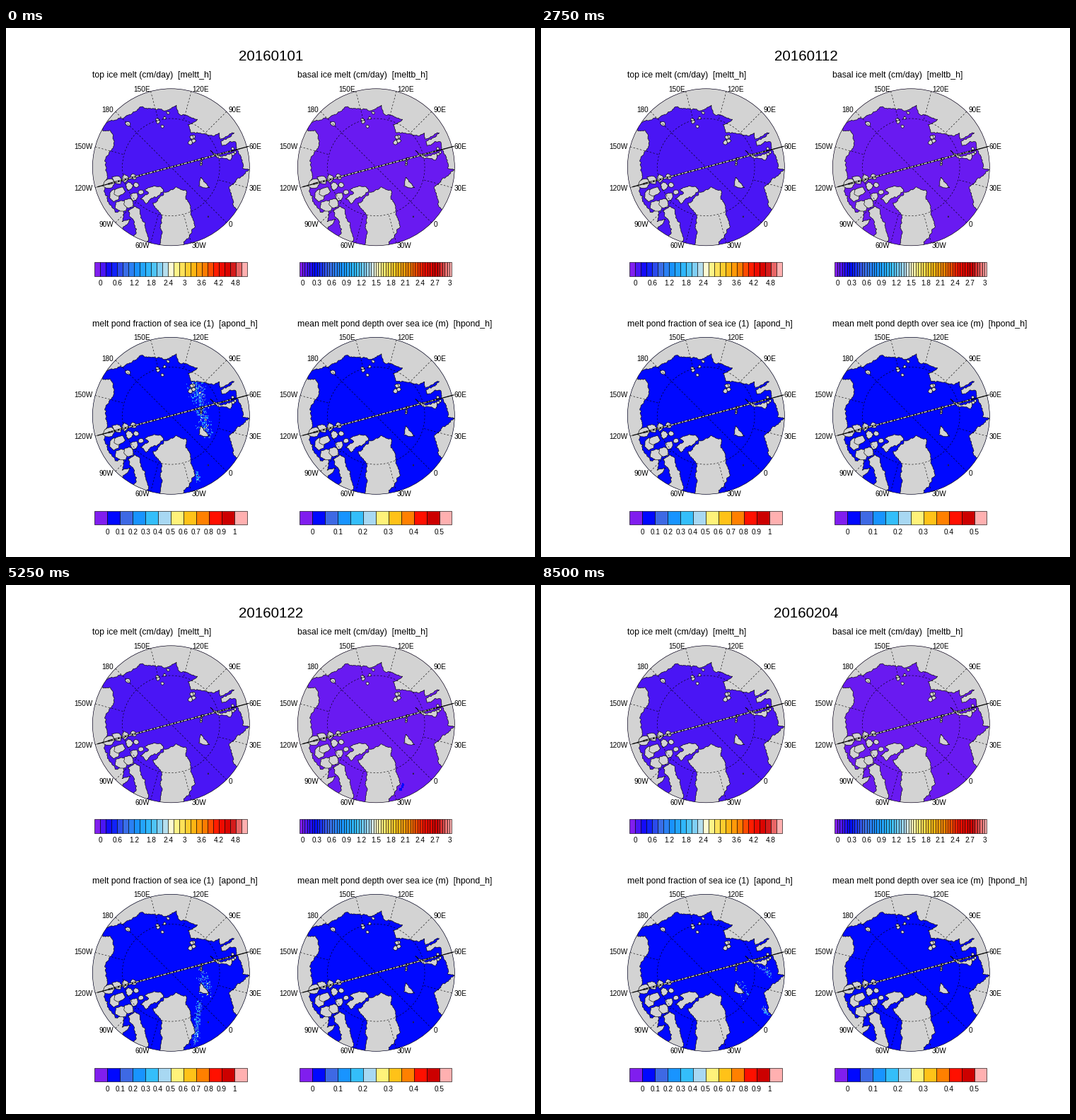
Animation, 748 px wide and 748 px high, one loop 8.75 s. Source, as a matplotlib script:

```python
import numpy as np
import matplotlib.pyplot as plt
from matplotlib.animation import FuncAnimation
from matplotlib.collections import PolyCollection
from matplotlib.patches import Circle, Rectangle

SIZE, DPI = 748, 88
PX = 72 / DPI  # points per pixel
DAYS, STEP = 35, 250
RADIUS = 111
THIN = 0.6 * PX
LAND = "#d3d3d3"
RAMP = {0: "#801eee", 1: "#0008ff", 2: "#3e69e4", 3: "#1894ff", 4: "#34befa",
        5: "#a8d8f2", 5.5: "#fffcd2", 6: "#fff27a", 7: "#ffc218",
        8: "#ff8000", 9: "#ff1000", 10: "#cc0000", 11: "#ffb0b0"}
plt.rcParams["font.family"] = "Liberation Sans"

fig = plt.figure(figsize=(SIZE / DPI, SIZE / DPI), dpi=DPI, facecolor="white")
ax = fig.add_axes([0, 0, 1, 1])
ax.set_xlim(0, SIZE)
ax.set_ylim(SIZE, 0)
ax.axis("off")
rng = np.random.default_rng(16)


def ramp(level):
    rgb = plt.matplotlib.colors.to_rgba_array(list(RAMP.values()))
    return np.stack([np.interp(level, list(RAMP), c) for c in rgb.T], axis=-1)


def project(lon, lat):
    """Polar stereographic offsets in pixels from the pole."""
    r = 522.6 * np.tan(np.radians(90 - np.asarray(lat)) / 2)
    a = np.radians(np.asarray(lon) - 45)
    return np.stack([r * np.cos(a), -r * np.sin(a)], axis=-1)


def rough(pts, rounds=4):
    """Make a closed outline ragged by midpoint displacement."""
    for i in range(rounds):
        nxt = np.roll(pts, -1, axis=0)
        d = nxt - pts
        amount = 0.08 + 0.07 * i
        push = rng.uniform(-amount, amount, (len(pts), 1))
        mid = (pts + nxt) / 2 + push * np.stack([-d[:, 1], d[:, 0]], axis=-1)
        pts = np.stack([pts, mid], axis=1).reshape(-1, 2)
    return pts


def coast(points, rim=()):
    pts = points + [(lon, 50) for lon in rim]
    return rough(project(*np.array(pts, float).T))


def islet(center, size):
    a = np.linspace(0, 2 * np.pi, 7, endpoint=False)
    r = size * rng.uniform(0.65, 1.2, 7)
    return rough(center + np.stack([r * np.cos(a), r * np.sin(a)], axis=-1), 2)


# key points of the large coasts as (lon, lat)
EURASIA = [
    (190, 64), (190, 66), (180, 68.9), (170.5, 69.6), (160, 69.5), (150, 71.6),
    (140, 72.5), (130, 70.9), (126, 73.5), (113, 73.5), (106, 73.2),
    (113, 75.8), (104, 77.7), (88, 75.2), (81, 73.3), (80, 71.8), (75, 72.6),
    (73.5, 68), (72, 72.8), (68, 73), (67, 69), (54, 68.4), (44, 68),
    (43, 66), (36, 69), (26, 71.1), (14, 68), (11.5, 64.8)]
AMERICA = [
    (-168, 64.5), (-163, 66.5), (-166, 68.4), (-156.5, 71.3), (-141, 69.6),
    (-128, 70.2), (-115, 68.2), (-96, 68), (-95, 71.9), (-87, 67.6),
    (-83, 69.7), (-84, 64)]
GREENLAND = [
    (-33, 83.6), (-12, 81.5), (-20, 79), (-18, 77), (-22, 73), (-23, 70.3),
    (-36, 66), (-43, 59), (-53.5, 66), (-54, 70.5), (-58, 75.5), (-72, 77.5),
    (-60, 82)]
BAFFIN = [(-81, 73.7), (-67, 69.5), (-62, 66.5), (-66, 62), (-74, 63),
          (-74, 68.3), (-89, 71), (-88, 73.6)]
ELLESMERE = [(-62, 82.4), (-76, 78.8), (-79, 76.4), (-89, 76.5), (-86, 79.5),
             (-94, 79.3), (-88, 82), (-75, 83.1)]
NOVAYA = [(68, 76.8), (55.5, 75), (52, 71.5), (57, 70.6), (57, 74)]
SVALBARD = [(11, 79.6), (26, 80.3), (21, 78.5), (17, 76.6), (13, 78)]

shapes = [coast(EURASIA, range(10, 191, 20)), coast(AMERICA, range(-84, -169, -14))]
shapes += [coast(p) for p in (GREENLAND, BAFFIN, ELLESMERE, NOVAYA, SVALBARD)]

# island rows of the western archipelago: lat, size, lon spacing
for lat, size, gap in [(70.6, 8.5, 12), (73, 7.5, 13), (75.6, 6, 12), (77.9, 4, 13)]:
    for lon in np.arange(-121, -86, gap):
        shapes.append(islet(project(lon, lat) + rng.normal(0, 1, 2), size))

# scattered groups: lon, lat, spread, count, size
for lon, lat, spread, count, size in [
        (55, 80.8, 3, 7, 1.6), (98, 79.3, 3, 4, 3.2), (143, 75.2, 4, 5, 2.4),
        (180, 71.2, 0, 1, 3.5), (57, 70, 3, 3, 2.2), (-8, 71, 0, 1, 0.9)]:
    for offset in rng.normal(0, spread, (count, 2)):
        shapes.append(islet(project(lon, lat) + offset, size))


def label(x, y, text, size, ha="center"):
    return ax.text(x, y + 0.35 * size, text, fontsize=size * PX, ha=ha,
                   va="baseline", color="black")


def lon_name(lon):
    if lon % 180 == 0:
        return str(lon)
    return f"{lon}E" if lon < 180 else f"{360 - lon}W"


def draw_map(cx, cy, color):
    mid = np.array([cx, cy])
    disc = Circle(mid, RADIUS, fc=color, ec="none", zorder=1)
    ax.add_patch(disc)
    land = PolyCollection([s + mid for s in shapes], facecolors=LAND,
                          edgecolors="black", linewidths=THIN, zorder=3)
    ax.add_collection(land)
    land.set_clip_path(disc)

    def line(p, q, width, color="black", z=4, **kw):
        ax.plot(*np.transpose([mid + p, mid + q]), color=color, lw=width * PX,
                zorder=z, solid_capstyle="butt", dash_capstyle="butt", **kw)

    # data gap along the grid seam
    u = project(60, 66) / RADIUS
    line(-92 * u, 90 * u, 2.4)
    line(-92 * u, 90 * u, 1.4, LAND, dashes=(3.2, 1.2, 1.8, 1))
    line(-108 * u, -88 * u, 1.2)
    line(88 * u, 114 * u, 1.2)

    dashes = (4, 4)
    for lon in range(0, 360, 30):
        inner = 90 if lon % 180 == 0 else 75
        line(project(lon, 66), project(lon, inner), 0.6, z=5, dashes=dashes)
        x, y = mid + project(lon, 66) * 114.5 / RADIUS
        label(x, y, lon_name(lon), 10, "left" if x > cx else "right")
    ring = mid + project(np.linspace(0, 360, 181), 75)
    ax.plot(*ring.T, color="black", lw=THIN, zorder=5, dashes=dashes)
    ax.add_patch(Circle(mid, RADIUS, fill=False, ec="black", lw=THIN, zorder=6))
    return disc


def draw_bar(x, y, cells, count, stride, step):
    w = 215 / cells
    for i, c in enumerate(ramp(np.arange(cells) * 11 / (cells - 1))):
        ax.add_patch(Rectangle((x + i * w, y), w, 19.5, fc=c, ec="black", lw=THIN))
    for i in range(count):
        label(x + (1 + stride * i) * w, y + 29.5,
              f"{i * step:.1f}".removesuffix(".0"), 10)


# name, bar cells, tick count, cells per tick, tick step
PANELS = [
    ("top ice melt (cm/day)  [meltt_h]", 27, 9, 3, 0.6),
    ("basal ice melt (cm/day)  [meltb_h]", 62, 11, 6, 0.3),
    ("melt pond fraction of sea ice (1)  [apond_h]", 12, 11, 1, 0.1),
    ("mean melt pond depth over sea ice (m)  [hpond_h]", 12, 6, 2, 0.1),
]


def corner(panel):
    return 290 * (panel % 2), 351.5 * (panel // 2)


def pole(panel):
    dx, dy = corner(panel)
    return 233.3 + dx, 196.8 + dy


discs = []
for i, (name, cells, *marks) in enumerate(PANELS):
    dx, dy = corner(i)
    label(122 + dx, 66 + dy, name, 12.25, "left")
    discs.append(draw_map(*pole(i), ramp(11 / (cells - 1))))
    draw_bar(125.5 + dx, 331 + dy, cells, *marks)

date = label(374.5, 38.5, "", 20.5)

# panel, streak start and end from the pole, spread, count, heat,
# peak day, days to fade
PONDS = [
    (2, (34, -45), (42, -22), 5, 220, 1.1, 0, 4),
    (2, (42, -16), (51, 28), 4, 220, 1.1, 0, 4),
    (2, (38, 80), (38, 92), 2, 36, 1.5, 0, 4),
    (2, (40, 40), (34, 100), 2, 230, 0.8, 21, 9),
    (2, (45, 0), (50, 30), 4, 120, 0.8, 21, 4),
    (2, (50, 16), (55, 32), 4, 40, 0.6, 34, 4),
    (2, (81, 50), (88, 60), 1.6, 50, 1.5, 34, 8),
    (2, (76, -9), (92, 3), 2, 45, 0.8, 34, 4),
    (1, (39, 84), (34, 96), 0.9, 26, 0, 21, 3),
]


def speckles(k, day):
    panel, start, end, spread, count, heat, peak, fade = PONDS[k]
    gen = np.random.default_rng(k + 40)
    xy = start + gen.random((count, 1)) * np.subtract(end, start)
    xy += gen.normal(0, spread, xy.shape)
    base = 1.7 if heat else 1
    level = np.clip(base + heat * gen.exponential(1, count), 1, 9)
    drift = np.random.default_rng([day, k]).normal(0, 0.5, xy.shape)
    xy = np.round((xy + drift) / 1.4) * 1.4
    n = int(count * max(0, 1 - abs(day - peak) / fade))
    return (xy + pole(panel))[:n], ramp(level)[:n]


ponds = []
for panel, *_ in PONDS:
    dots = ax.scatter([], [], s=(1.5 * PX) ** 2, marker="s", linewidths=0, zorder=2)
    dots.set_clip_path(discs[panel])
    ponds.append(dots)


def update(day):
    month, dom = divmod(day, 31)
    date.set_text(f"2016{month + 1:02d}{dom + 1:02d}")
    for k, dots in enumerate(ponds):
        xy, colors = speckles(k, day)
        dots.set_offsets(xy)
        dots.set_facecolors(colors)
    return [date, *ponds]


anim = FuncAnimation(fig, update, frames=DAYS, interval=STEP, repeat=True,
                     repeat_delay=0, blit=False)
plt.show()
```
